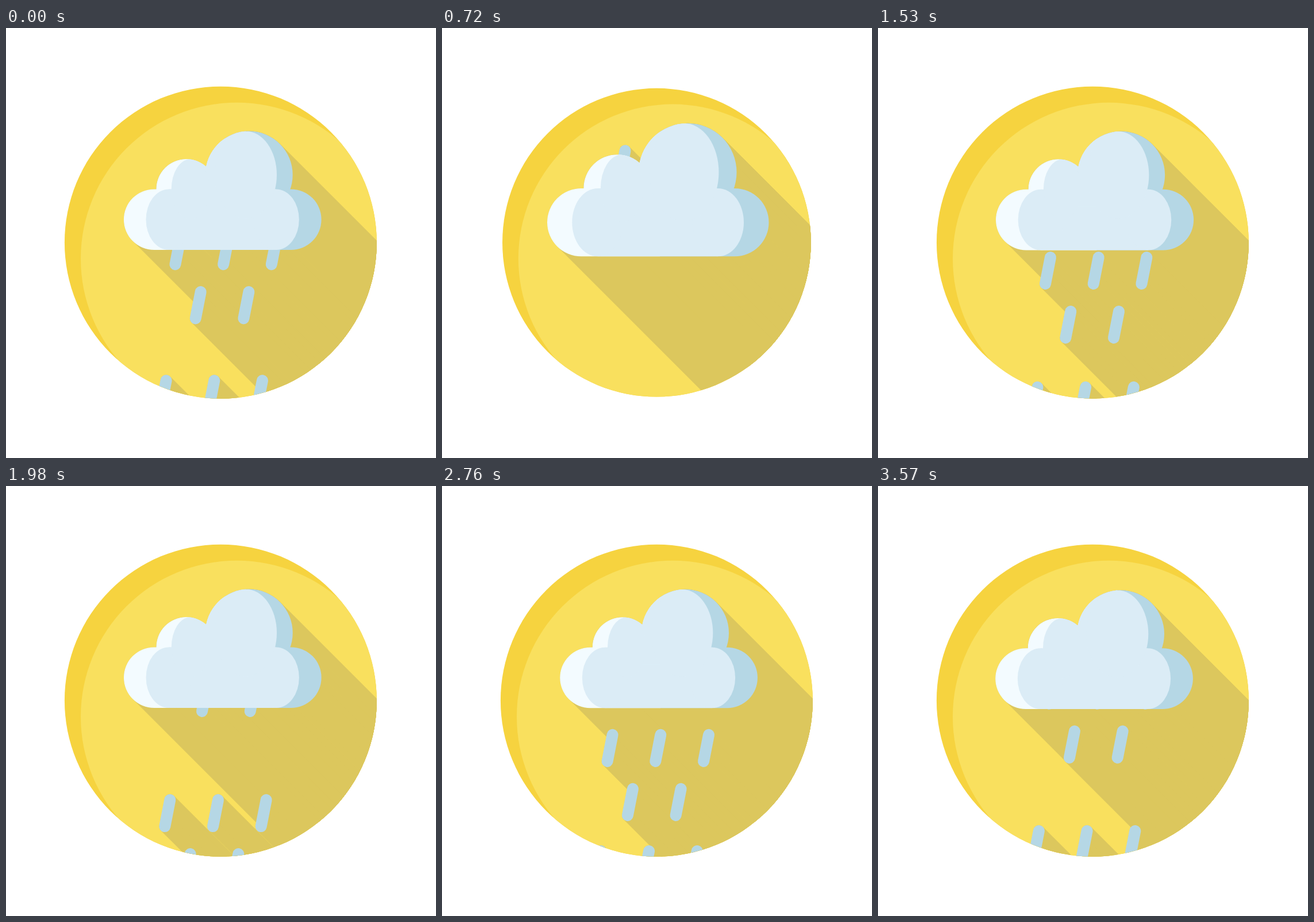
Animation of 748 by 748 pixels, one loop 3.6 s. Source, as an HTML page with a canvas:

```html
<!DOCTYPE html>
<html lang="en">
<head>
<meta charset="utf-8">
<title>Rain cloud</title>
<style>
  html, body { margin: 0; height: 100%; overflow: hidden; background: #fff; }
  canvas { display: block; }
</style>
</head>
<body>
<canvas id="stage" width="748" height="748"></canvas>
<script>
const ctx = document.getElementById('stage').getContext('2d');
const STEP = 30, FRAMES = 120, TAU = Math.PI * 2;
const SUN = { x: 373.4, y: 373.2, r: 271.5 };
const PIVOT = { x: 376.7, y: 282.7 };
const COLOR = {
  rim: '#f6d33f', sun: '#f9e05e', shade: '#dcc75d',
  light: '#f3fbff', cloud: '#dbecf6', blue: '#b5d7e5'
};
// Cloud as capsules: x1, y1, x2, y2, radius
const LOBES = [
  [257.7, 333.2, 495.8, 333.2, 52.8],
  [313.6, 280.2, 313.6, 280.2, 52.2],
  [422.7, 255.4, 422.7, 255.4, 76]
];
// Cloud drift: step, dx, dy
const DRIFT = [
  [0, 0, 0], [24, -1, -1.2], [51, .3, .4], [81, -.2, -.4],
  [102, .8, .9], [119, -.7, 1.9], [120, 0, 0]
];

// Linear growth, then a damped overshoot
function pop(n) {
  if (n <= 0) return 0;
  if (n < 10) return n / 10;
  return 1 + .3 * Math.sin(.2765 * (n - 10)) * Math.exp(-.1867 * (n - 10));
}

function driftAt(n) {
  const i = DRIFT.findIndex(key => key[0] >= n);
  if (i < 1) return [0, 0];
  const a = DRIFT[i - 1], b = DRIFT[i], k = (n - a[0]) / (b[0] - a[0]);
  return [a[1] + (b[1] - a[1]) * k, a[2] + (b[2] - a[2]) * k];
}

function disc(x, y, r) {
  ctx.beginPath();
  ctx.arc(x, y, r, 0, TAU);
}

function segment(x1, y1, x2, y2, r, color) {
  ctx.beginPath();
  ctx.moveTo(x1, y1);
  ctx.lineTo(x2, y2);
  ctx.lineWidth = 2 * r;
  ctx.strokeStyle = color;
  ctx.stroke();
}

// Sweep a capsule towards the lower right
function castShadow([x1, y1, x2, y2, r]) {
  for (let k = 0; k <= 1; k += .25) {
    const x = x1 + (x2 - x1) * k, y = y1 + (y2 - y1) * k;
    segment(x, y, x + 700, y + 700, r, COLOR.shade);
  }
}

function rainDrops(step) {
  const drops = [];
  for (let start = 30; start <= 130; start += 10) {
    const n = step - start;
    if (n < -6 || n > 20) continue;
    const fall = 232 * Math.atan((n - 1) / 6.8);
    for (let i = 0; i < 5; i++) {
      const lower = i > 2;
      const x = 300 - fall * .1 + (lower ? 35.3 + (i - 3) * 83.7 : i * 83.7);
      const y = 399 + fall + (lower ? 94 : 0);
      drops.push([x, y, x - 9, y + 46, 10]);
    }
  }
  return drops;
}

function withCloud(scale, [dx, dy], paint) {
  ctx.save();
  ctx.translate(PIVOT.x + dx, PIVOT.y + dy);
  ctx.scale(scale, scale);
  ctx.translate(-PIVOT.x, -PIVOT.y);
  paint();
  ctx.restore();
}

function paintCloud() {
  ctx.beginPath();
  for (const [x1, y1, x2, y2, r] of LOBES) {
    ctx.moveTo(x1, y1 - r);
    ctx.arc(x2, y2, r, -TAU / 4, TAU / 4);
    ctx.arc(x1, y1, r, TAU / 4, TAU * 3 / 4);
    ctx.closePath();
  }
  ctx.clip();
  ctx.fillStyle = COLOR.light;
  ctx.fillRect(200, 170, 180, 230);
  ctx.fillStyle = COLOR.blue;
  ctx.fillRect(380, 170, 180, 230);
  ctx.fillStyle = COLOR.cloud;
  ctx.fillRect(283, 280.4, 187, 106);
  ctx.fillRect(321, 170, 96, 140);
  const cores = [[283, 333.2, 39.5, 52.8], [470, 333.2, 39.8, 52.8],
                 [321, 280.2, 33.3, 52.2], [417, 255.4, 54, 76]];
  for (const [x, y, rx, ry] of cores) {
    ctx.beginPath();
    ctx.ellipse(x, y, rx, ry, 0, 0, TAU);
    ctx.fill();
  }
}

function draw(step) {
  const sunScale = pop(step - 1), cloudScale = pop(step - 11.4);
  const drift = driftAt(step), drops = rainDrops(step);
  const r = SUN.r * sunScale, shift = 28.1 * sunScale;

  ctx.fillStyle = '#fff';
  ctx.fillRect(0, 0, 748, 748);
  ctx.lineCap = 'round';

  ctx.save();
  disc(SUN.x, SUN.y, r);
  ctx.fillStyle = COLOR.rim;
  ctx.fill();
  ctx.clip();
  disc(SUN.x + shift, SUN.y + shift, r);
  ctx.fillStyle = COLOR.sun;
  ctx.fill();
  if (cloudScale) withCloud(cloudScale, drift, () => LOBES.forEach(castShadow));
  drops.forEach(castShadow);
  drops.forEach(drop => segment(...drop, COLOR.blue));
  ctx.restore();

  if (cloudScale) withCloud(cloudScale, drift, paintCloud);
}

function tick() {
  draw(Math.floor(performance.now() / STEP) % FRAMES || FRAMES);
  requestAnimationFrame(tick);
}
tick();
</script>
</body>
</html>
```
